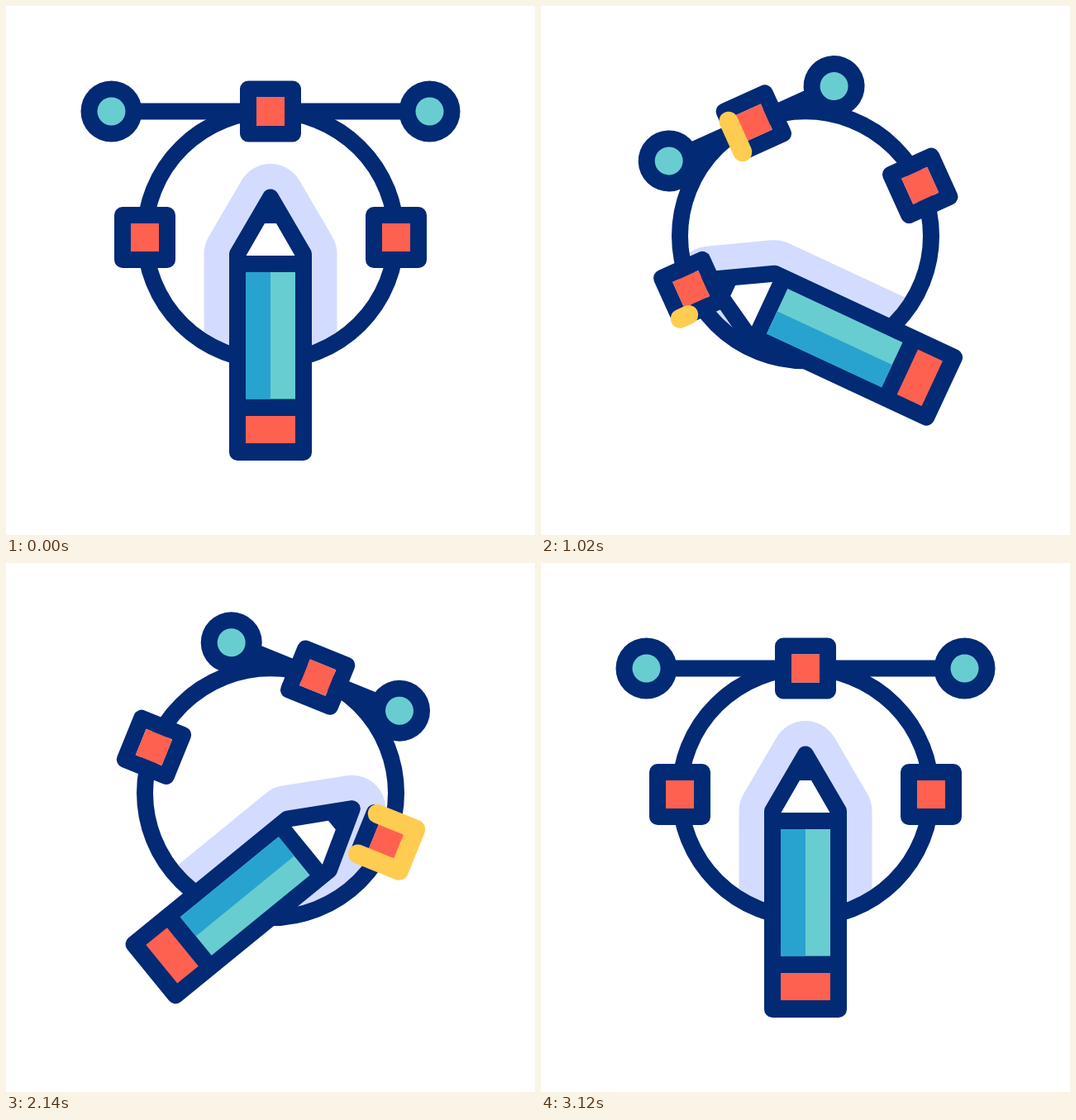
An HTML page with a canvas that plays this animation: 640 px wide and 640 px high, repeating every 3.22 s.

```html
<!DOCTYPE html>
<html lang="en">
<head>
<meta charset="utf-8">
<title>Vector pencil</title>
<style>
html, body { margin: 0; width: 100%; height: 100%; overflow: hidden; background: #fff; }
canvas { display: block; width: 640px; height: 640px; }
</style>
</head>
<body>
<canvas id="stage" width="640" height="640"></canvas>
<script>
const ctx = document.getElementById('stage').getContext('2d');
const LOOP = 3220;
const NAVY = '#022a75', RED = '#ff6150', TEAL = '#68cdd1', BLUE = '#28a3cf';
const YELLOW = '#ffcc52', HALO = '#d3dcfe';
const CX = 320, HEAD_Y = 279.5, PENCIL_Y = 334.5, REACH = 152;
const rad = deg => deg * Math.PI / 180;
const clamp = v => Math.min(1, Math.max(0, v));

// Eased progress from 0 to 1 between two times.
const move = (t, start, end) => (1 - Math.cos(Math.PI * clamp((t - start) / (end - start)))) / 2;

// The head rocks left, then right, then settles.
const headTurn = t =>
  -28 * move(t, 240, 825) + 53 * move(t, 825, 1983) - 25 * move(t, 1983, 2695);

const handleSlide = t => move(t, 220, 600) - move(t, 2500, 2890);

// The pencil taps the top, left and right anchors, and the top once more.
const pencilTurn = t =>
  -14.6 * move(t, 225, 535) - 50.4 * move(t, 535, 1010) +
  125 * move(t, 1060, 1885) - 60 * move(t, 1890, 2870);

const pencilX = t =>
  CX - 23 * move(t, 400, 1010) + 42 * move(t, 1340, 1860) - 19 * move(t, 2220, 2870);

const pencilY = t =>
  PENCIL_Y - 70 * move(t, 225, 535) + 110 * move(t, 535, 1010) - 3 * move(t, 1010, 1900) -
  22 * move(t, 1900, 2440) - 90 * move(t, 2440, 2870) + 75 * move(t, 2870, 3110);

function disc(x, y, r, color) {
  ctx.fillStyle = color;
  ctx.beginPath();
  ctx.arc(x, y, r, 0, 2 * Math.PI);
  ctx.fill();
}

function box(x, y, w, h, color) {
  ctx.fillStyle = color;
  ctx.fillRect(x, y, w, h);
}

function stroke(color, width) {
  ctx.strokeStyle = color;
  ctx.lineWidth = width;
  ctx.stroke();
}

function ringPath() {
  ctx.beginPath();
  ctx.ellipse(CX, 278.3, REACH, REACH - 1, 0, 0, 2 * Math.PI);
}

function pencilBody(color, width) {
  ctx.beginPath();
  ctx.moveTo(-40, 205.5);
  ctx.lineTo(40, 205.5);
  ctx.lineTo(40, -34.5);
  ctx.lineTo(0, -103);
  ctx.lineTo(-40, -34.5);
  ctx.closePath();
  ctx.fillStyle = color;
  ctx.fill();
  stroke(color, width);
}

function pencilTip() {
  ctx.beginPath();
  ctx.moveTo(-29.5, -32.5);
  ctx.lineTo(-7, -71.5);
  ctx.lineTo(7, -71.5);
  ctx.lineTo(29.5, -32.5);
  ctx.fillStyle = '#fff';
  ctx.fill();
}

function placePencil(t) {
  ctx.translate(pencilX(t), pencilY(t));
  ctx.rotate(rad(pencilTurn(t)));
}

function drawHalo(t) {
  ctx.save();
  ringPath();
  ctx.clip();
  placePencil(t);
  pencilBody(HALO, 81);
  ctx.restore();
}

function drawPencil(t) {
  ctx.save();
  placePencil(t);
  pencilBody(NAVY, 20);
  pencilTip();
  box(-30, -12.5, 60, 153.5, TEAL);
  box(-30, -12.5, 30, 153.5, BLUE);
  box(-30, 161.5, 60, 33, RED);
  ctx.restore();
}

// A line that grows along its path, then is eaten up from its tail.
function trail(length, start, growTime, t, width) {
  const head = clamp((t - start) / growTime) * length;
  const tail = clamp((t - start - 242) / 304) * length;
  if (head <= tail) return;
  ctx.setLineDash([head - tail, length * 4]);
  ctx.lineDashOffset = -tail;
  stroke(YELLOW, width);
  ctx.setLineDash([]);
}

function sweep(x, y, r, from, to, start, t) {
  ctx.beginPath();
  ctx.arc(x, y, r, rad(from), rad(to), to < from);
  trail(r * rad(Math.abs(to - from)), start, 230, t, 20);
}

function anchor(x, y, start, t) {
  const half = 27;
  ctx.save();
  ctx.translate(x, y);
  ctx.beginPath();
  ctx.rect(-half, -half, 2 * half, 2 * half);
  stroke(NAVY, 20);
  box(-17, -17, 34, 34, RED);
  // Flipped upward, so the trail runs anticlockwise from the lower left corner.
  ctx.beginPath();
  ctx.rect(-half, half, 2 * half, -2 * half);
  trail(8 * half, start, 300, t, 23);
  ctx.restore();
}

function placeHead(t) {
  ctx.translate(CX, HEAD_Y);
  ctx.rotate(rad(headTurn(t)));
}

function drawHandles(t) {
  const slide = handleSlide(t);
  const left = -192.5 + 79.8 * slide, right = 192.5 - 85.8 * slide;
  ctx.save();
  placeHead(t);
  ctx.beginPath();
  ctx.moveTo(left, -REACH);
  ctx.lineTo(right, -REACH);
  stroke(NAVY, 20);
  for (const x of [left, right]) {
    disc(x, -REACH, 37, NAVY);
    disc(x, -REACH, 17, TEAL);
  }
  ctx.restore();
}

function drawAnchors(t) {
  ctx.save();
  placeHead(t);
  anchor(0, -REACH, 533, t);
  anchor(-REACH, 0.5, 1005, t);
  anchor(REACH, 0.5, 1921, t);
  ctx.restore();
}

function draw(t) {
  ctx.lineCap = ctx.lineJoin = 'round';
  box(0, 0, 640, 640, '#fff');
  sweep(226, 445, 105, 195, 65, 265, t);
  sweep(460, 372, 102.3, -15, 111, 1235, t);
  drawHalo(t);
  ringPath();
  stroke(NAVY, 20);
  drawHandles(t);
  drawPencil(t);
  drawAnchors(t);
}

function tick() {
  draw(performance.now() % LOOP);
  requestAnimationFrame(tick);
}
tick();
</script>
</body>
</html>
```
